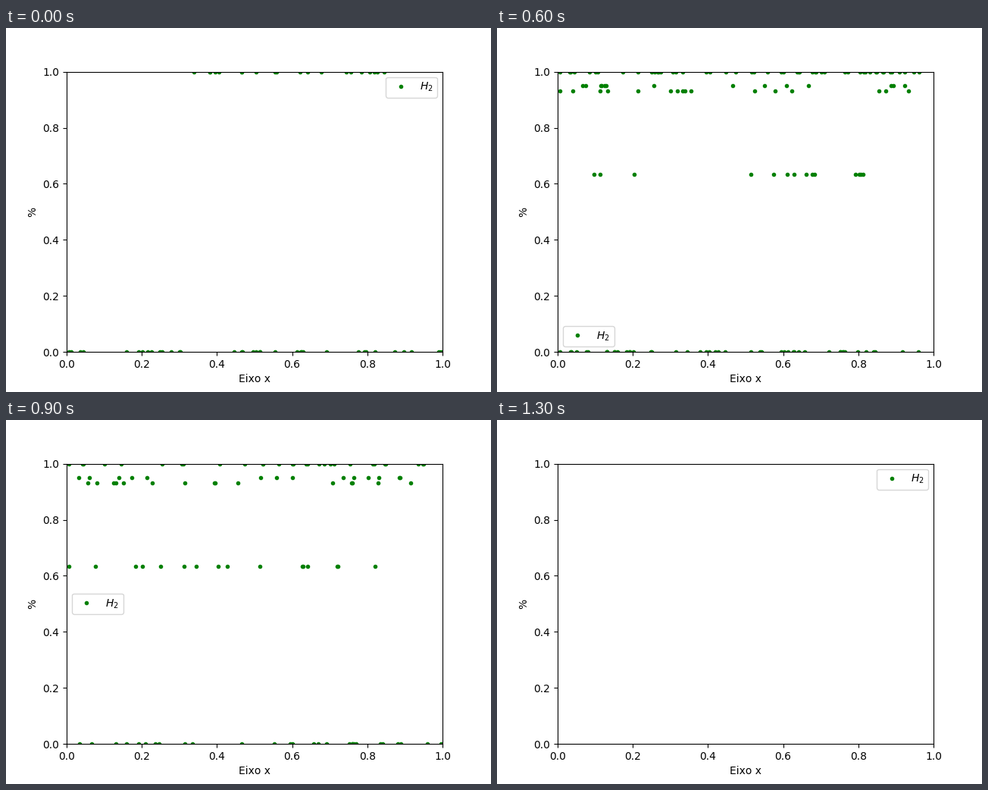
These frames come from a looping animation (640x480 px, 3000 ms). A matplotlib script:

```python
import numpy as np
import matplotlib.pyplot as plt
from matplotlib.animation import FuncAnimation

FRAMES, INTERVAL = 30, 100
LAST_STEP = 13

plt.rcParams["text.kerning_factor"] = 6
rng = np.random.default_rng(7)


def simulate(levels, crowd, flow):
    """Return the dots of every step for one stream of particles.

    Particles wait on levels[0], then spend one step on each further level.
    crowd and flow map key steps to the number waiting and leaving.
    """
    def at(keys, step):
        return round(np.interp(step, list(keys), list(keys.values())))

    waiting = rng.random(at(crowd, 0))
    moving = [np.empty(0) for _ in levels[1:]]
    steps = []
    for step in range(LAST_STEP + 1):
        if step:
            rng.shuffle(waiting)
            target = at(crowd, step)
            leaving = min(len(waiting),
                          max(at(flow, step), len(waiting) - target))
            moving = [waiting[:leaving]] + moving[:-1]
            stay = waiting[leaving:]
            waiting = np.append(stay, rng.random(target - len(stay)))
        rows = [waiting] + moving
        steps.append((np.concatenate(rows),
                      np.repeat(levels, [len(r) for r in rows])))
    return steps


low = simulate((0.0, 0.931, 0.633),
               {0: 36, 4: 57, 7: 43, 9: 28, 11: 0}, {1: 8, 7: 17, 11: 13})
high = simulate((1.0, 0.95),
                {0: 20, 2: 45, 4: 54, 7: 48, 9: 29, 11: 0},
                {1: 6, 7: 16, 11: 12})


def legend_spot(step):
    if step in (0, LAST_STEP):
        return "upper right"
    return "lower left" if step in (6, 7) or step >= 10 else "center left"


fig, ax = plt.subplots(figsize=(6.4, 4.8), dpi=100)
ax.set(xlim=(0, 1), ylim=(0, 1), xlabel="Eixo x", ylabel="%")
dots, = ax.plot([], [], "g.", label="$H_2$")


def draw(frame):
    step = min(frame, LAST_STEP)
    dots.set_data(*np.hstack([low[step], high[step]]))
    ax.legend(loc=legend_spot(step))
    return dots,


anim = FuncAnimation(fig, draw, frames=FRAMES, interval=INTERVAL,
                     init_func=lambda: draw(0), repeat=True, repeat_delay=0)
plt.show()
```
